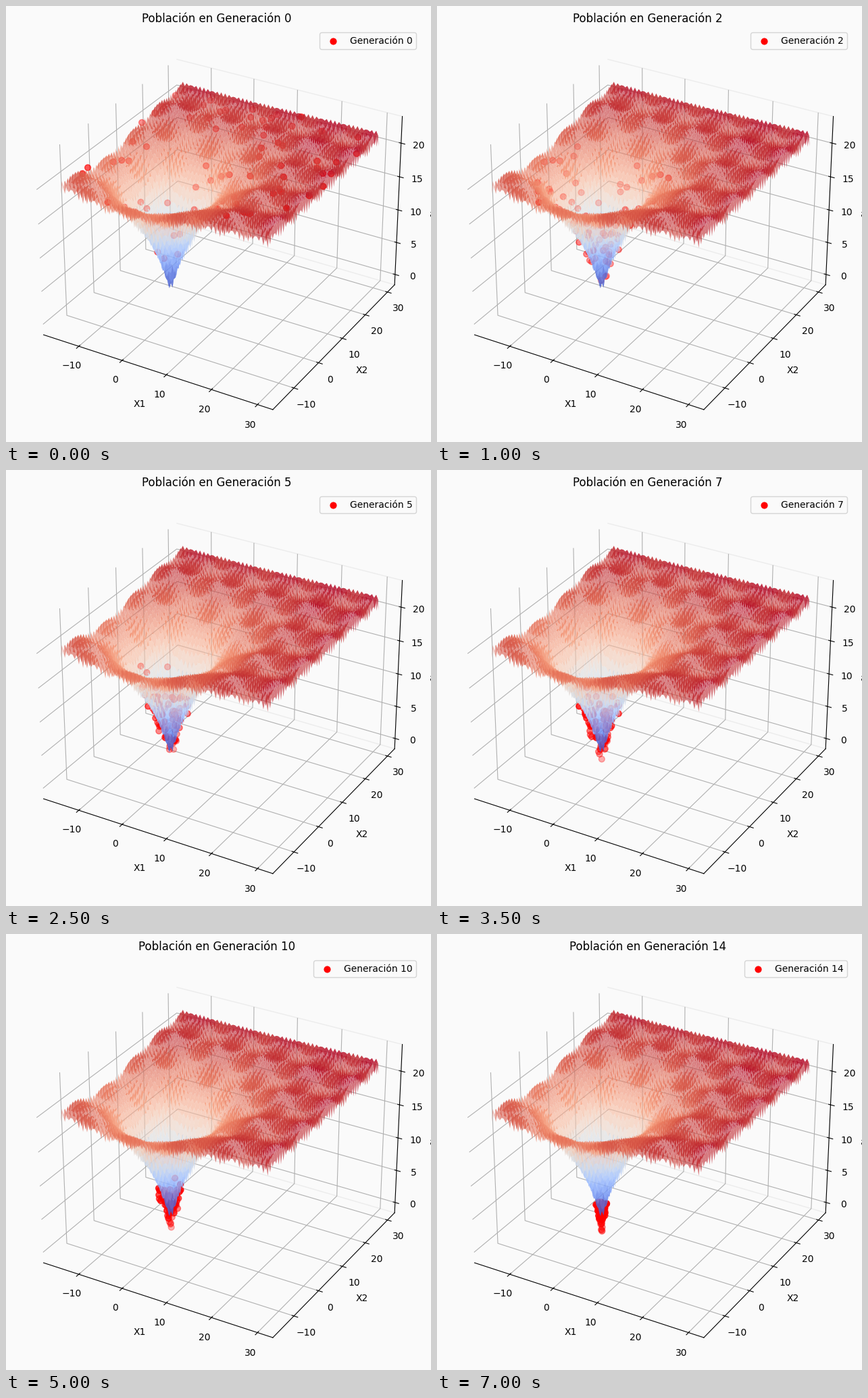
These frames come from a looping animation (629 px wide and 646 px high, 7500 ms). A matplotlib script:

```python
import numpy as np
import matplotlib.pyplot as plt
from matplotlib.animation import FuncAnimation

W, H, DPI = 629, 646, 100
LOW, HIGH = -15, 30
GENERATIONS, STEP_MS = 15, 500
PEOPLE = 80
PAPER = "#fafafa"


def ackley(x, y):
    bowl = -20 * np.exp(-0.2 * np.sqrt((x**2 + y**2) / 2))
    ripple = -np.exp((np.cos(2 * np.pi * x) + np.cos(2 * np.pi * y)) / 2)
    return bowl + ripple + 20 + np.e


def padded(lo, hi):
    """Limits with a 5 % data margin and the 3D view margin."""
    mid, half = (lo + hi) / 2, (hi - lo) / 2 * 1.1 * 25 / 24
    return mid - half, mid + half


def evolve(seed=7):
    """Yield each generation: the outermost are replaced by crossovers."""
    rng = np.random.default_rng(seed)
    pop = rng.uniform(LOW, HIGH, (PEOPLE, 2))
    yield pop.copy()
    for gen in range(1, GENERATIONS):
        radius = max(18 * 0.8 ** (gen - 1), 1.2)
        lost = np.hypot(*pop.T) > radius
        parents, count = pop[~lost], lost.sum()
        mix = np.column_stack([rng.choice(parents[:, k], count) for k in (0, 1)])
        pop[lost] = mix * np.sqrt(rng.random((count, 1)))
        yield pop.copy()


plt.rcParams["font.family"] = "DejaVu Sans"
fig = plt.figure(figsize=(W / DPI, H / DPI), dpi=DPI, facecolor=PAPER)
ax = fig.add_axes([10 / W, 9.9 / H, 604 / W, 604 / H], projection="3d")
ax.set_facecolor(PAPER)

grid = np.linspace(LOW, HIGH, 100)
X, Y = np.meshgrid(grid, grid)
Z = ackley(X, Y)
ax.plot_surface(X, Y, Z, cmap="coolwarm", alpha=0.6)

ax.set(xlim=padded(LOW, HIGH), ylim=padded(LOW, HIGH),
       zlim=padded(Z.min(), Z.max()),
       xlabel="X1", ylabel="X2", zlabel="f(X1, X2)")
for side, edge in ((ax.xaxis, "none"), (ax.yaxis, "#ececec"), (ax.zaxis, "none")):
    side.pane.set_alpha(None)
    side.pane.set_facecolor("none")
    side.pane.set_edgecolor(edge)

history = list(evolve())
dots = None


def draw(gen):
    global dots
    if dots is not None:
        dots.remove()
    x, y = history[gen].T
    dots = ax.scatter(x, y, ackley(x, y), c="red", s=40, label=f"Generación {gen}")
    ax.set_title(f"Población en Generación {gen}")
    ax.legend(loc="upper right", facecolor=PAPER)
    return []


anim = FuncAnimation(fig, draw, frames=GENERATIONS, init_func=lambda: [],
                     interval=STEP_MS, repeat=True, repeat_delay=0)
plt.show()
```
